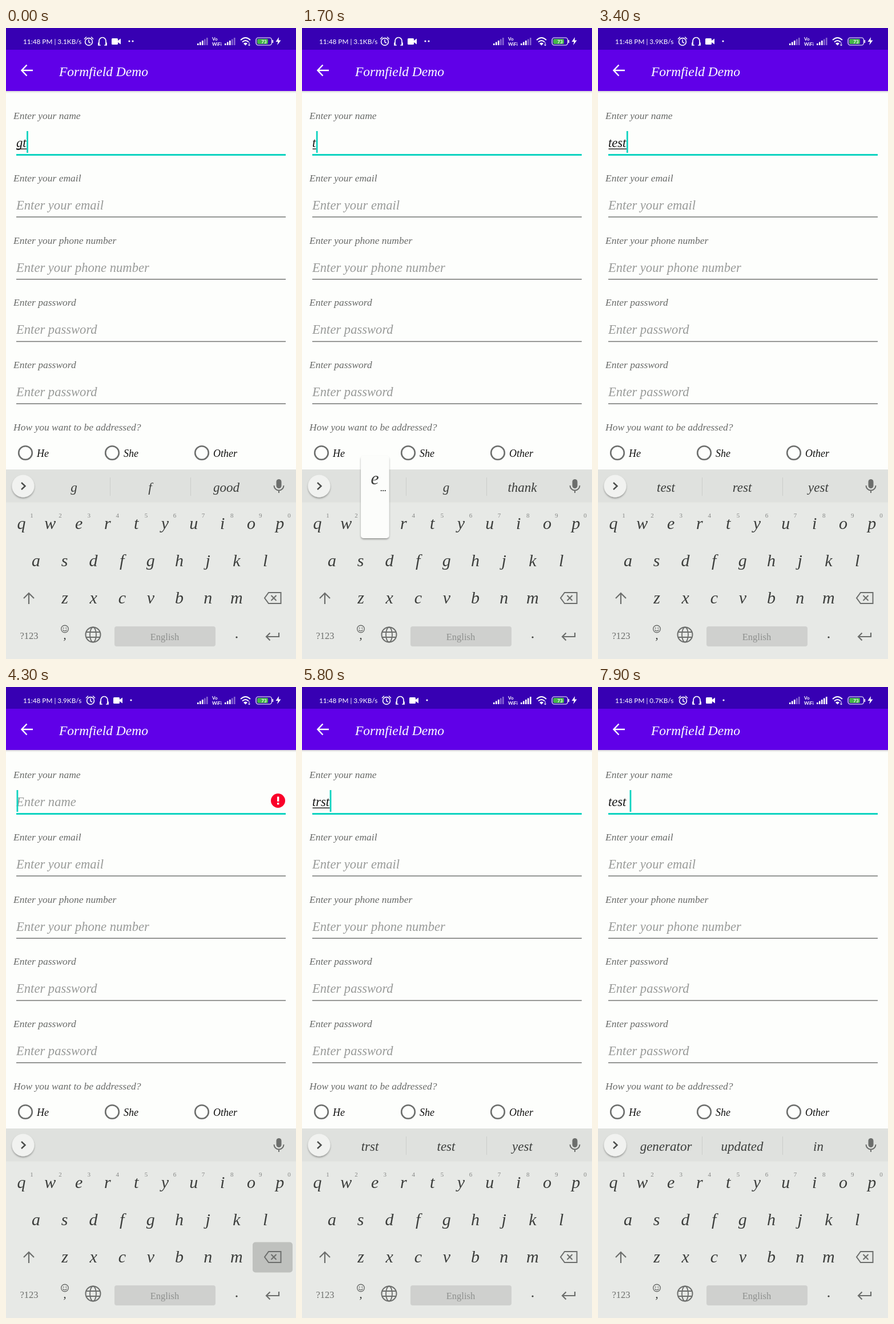
An HTML page for the animation above (8000 ms loop, 508 by 1102 pixels).

```html
<!DOCTYPE html>
<html lang="en">
<head>
<meta charset="utf-8">
<title>Form entry</title>
<style>
  html, body { margin: 0; width: 100%; height: 100%; overflow: hidden; background: #fdfefc; }
  svg { display: block; width: 508px; height: 1102px; }
  text { font-family: "Liberation Serif", "Times New Roman", serif; font-style: italic; white-space: pre; }
  .status { font: 11.8px Lato, sans-serif; fill: #fff; }
  .tiny { font: bold 8px Lato, sans-serif; fill: #fff; }
  .upright { font-style: normal; }
  .mid { text-anchor: middle; }
</style>
</head>
<body>
<svg id="stage" viewBox="0 0 508 1102" xmlns="http://www.w3.org/2000/svg"></svg>
<script>
const LOOP = 8000, STEP = 100;
const INPUT_SIZE = 22.6, INPUT_X = 18;

// Markup helpers
const text = (x, y, size, color, str, extra = '') =>
  `<text x="${x}" y="${y}" font-size="${size}" fill="${color}" ${extra}>${str}</text>`;
const mid = (x, y, size, color, str, cls = '', extra = '') =>
  text(x, y, size, color, str, `class="mid ${cls}" ${extra}`);
const rect = (x, y, w, h, fill, extra = '') =>
  `<rect x="${x}" y="${y}" width="${w}" height="${h}" fill="${fill}" ${extra}/>`;
const line = (d, color, width, extra = '') =>
  `<path d="${d}" fill="none" stroke="${color}" stroke-width="${width}" ${extra}/>`;
const circle = (x, y, r, fill, extra = '') => `<circle cx="${x}" cy="${y}" r="${r}" fill="${fill}" ${extra}/>`;

const bars = (x, id = '') => `<g id="${id}">` + [0, 1, 2, 3, 4].map(i =>
  rect(x + i * 4, 27 - i * 2.5, 2.6, 3 + i * 2.5, '#fff', `opacity="${i < 3 ? 1 : .4}"`)).join('') + '</g>';

function statusBar() {
  return rect(0, 0, 508, 38, '#3700b3') +
    `<text id="rate" class="status" x="30" y="28"></text>
    <g id="icons" stroke-linecap="round">` +
      circle(145, 24, 6.4, 'none', 'stroke="#fff" stroke-width="1.6"') +
      line('M145 20.5V24.5L147.5 26M137.5 19L140.5 16M149.5 16L152.5 19', '#fff', 1.5) +
      line('M163 29V23A6 6.5 0 0 1 175 23V29M162 26V30H165M176 26V30H173', '#fff', 1.7) +
      rect(185, 18, 11, 11, '#fff', 'rx="1.5"') + '<path d="M196 22L201 18.5V28.5L196 25Z" fill="#fff"/>' +
      circle(216, 23, 1.6, '#fff') + circle(222, 23, 1.6, '#fff', 'id="dot2"') +
    '</g>' + bars(335) +
    '<text x="361" y="22" class="tiny">Vo</text><text x="361" y="31" class="tiny">WiFi</text>' +
    bars(383, 'sim2') +
    line('M411 21Q419.5 13 428 21M414 24.5Q419.5 19.5 425 24.5', '#fff', 1.8) +
    '<path d="M416 27Q419.5 24 423 27L419.5 30.5Z" fill="#fff"/>' +
    line('M426 25V31M424.5 29L426 31L427.5 29', '#fff', 1) +
    rect(438, 17, 27.5, 13, '#3700b3', 'rx="4" stroke="#fff" stroke-width="1.2"') +
    rect(440, 19, 19, 9, '#43b649', 'rx="2"') + rect(466.5, 21, 1.6, 5, '#fff') +
    '<text class="mid tiny" x="452" y="26.5">73</text>' +
    '<path d="M478 16L472.5 24H476.5L475 30L481.5 21.5H477.5Z" fill="#fff"/>';
}

function appBar() {
  return rect(0, 110, 508, 4, 'url(#drop)') + rect(0, 38, 508, 72, '#6000e8') +
    line('M47 74H28M36.5 64.5L27.5 74L36.5 83.5', '#fff', 2.5) +
    text(93, 84, 23.5, '#fff', 'Formfield Demo');
}

function form() {
  const labels = ['Enter your name', 'Enter your email', 'Enter your phone number',
    'Enter password', 'Enter password'];
  const fields = labels.map((label, i) => {
    const y = 159 + i * 108.75;
    return text(13, y, 17.5, '#686a68', label) + (i === 0 ? '' :
      text(INPUT_X, y + 49, INPUT_SIZE, '#999b99', label) + rect(18, y + 61.5, 472, 1.5, '#737573'));
  }).join('');
  const radios = [['He', 34, 54], ['She', 186, 206], ['Other', 343, 363]].map(([name, cx, tx]) =>
    circle(cx, 742, 11.8, 'none', 'stroke="#6d6f6d" stroke-width="2.6"') +
    text(tx, 749, 18, '#111', name)).join('');
  return fields + rect(18, 220, 472, 3, '#0fd3c0') +
    text(INPUT_X, 208, INPUT_SIZE, '#999b99', 'Enter name', 'id="hint"') +
    text(INPUT_X, 208, INPUT_SIZE, '#161616', '', 'id="typed"') +
    rect(18.5, 210.5, 10, 1.5, '#222', 'id="underline"') +
    rect(19, 180, 2.8, 38, '#0fd3c0', 'id="cursor"') +
    '<g id="errorIcon">' + circle(476.5, 198.5, 12.5, '#fa0029') +
      rect(475, 191.5, 3.4, 8.5, '#fff') + rect(475, 202, 3.4, 3.4, '#fff') + '</g>' +
    text(13, 703, 17.5, '#686a68', 'How you want to be addressed?') + radios +
    '<g id="tooltip">' + rect(388, 227, 111.5, 47, '#212421', 'filter="url(#shadow)"') +
      rect(388, 225.5, 111.5, 3, '#fa0029') + '<path d="M468 226L476.5 218L485 226Z" fill="#fa0029"/>' +
      mid(443.5, 260, 17.5, '#fff', 'Enter name') + '</g>';
}

const keys = {};
function keyboard() {
  const ink = '#3c3e3c', grey = '#6c6e6c';
  const rows = [['qwertyuiop', 27, 50.3], ['asdfghjkl', 52.5, 50.2], ['zxcvbnm', 103, 50.15]];
  const letters = rows.map(([chars, x0, gap], r) => [...chars].map((c, i) => {
    keys[c] = { x: x0 + i * gap, y: 875 + r * 65 };
    return mid(keys[c].x, keys[c].y, 30, ink, c) +
      (r ? '' : mid(45 + i * 50.1, 855, 11, '#858785', (i + 1) % 10, 'upright'));
  }).join('')).join('');
  return rect(0, 771, 508, 331, '#e7e9e6') + rect(0, 771, 508, 57.5, '#dfe1de') +
    circle(30, 800, 19.5, '#f1f2f0', 'filter="url(#shadow)"') +
    line('M27 794L33.5 800L27 806', '#4b4d4b', 2.4) +
    '<g id="dividers">' + rect(182, 785, 1, 32, '#cbcdca') + rect(323, 785, 1, 32, '#cbcdca') + '</g>' +
    [119, 252.5, 386].map((x, i) => mid(x, 809.5, 23, ink, '', '', `id="word${i}"`)).join('') +
    rect(473.5, 788, 9, 16, grey, 'rx="4.5"') +
    line('M469.5 799A8.5 8.5 0 0 0 486.5 799M478 807V812', grey, 2) + letters +
    line('M40 1006V987M31 996L40 987L49 996', grey, 2.2) +
    rect(432, 969.5, 70, 53, '#bfc1be', 'rx="5" id="erasePress"') +
    line('M460 986H481.5V1005H460L453 995.5ZM464.5 991L473.5 1000M473.5 991L464.5 1000', grey, 2) +
    mid(40.5, 1067, 16.5, grey, '?123', 'upright') +
    circle(103, 1049.5, 6.3, 'none', `stroke="${grey}" stroke-width="1.4"`) +
    circle(100.7, 1048, 1, grey) + circle(105.3, 1048, 1, grey) +
    line('M99.5 1051Q103 1055 106.5 1051', grey, 1.2) + mid(103, 1067, 22, ink, ',') +
    circle(152.5, 1059.5, 13, 'none', `stroke="${grey}" stroke-width="2"`) +
    `<ellipse cx="152.5" cy="1059.5" rx="5.5" ry="13" fill="none" stroke="${grey}" stroke-width="1.8"/>` +
    line('M141 1055H164M141 1064H164', grey, 1.8) +
    rect(190, 1045, 177, 35, '#cfd0ce', 'rx="4"') + mid(278, 1069, 16.5, '#8d8f8d', 'English', 'upright') +
    circle(404, 1064, 1.6, ink) +
    line('M478 1056V1063H456M462.5 1056.5L456 1063L462.5 1069.5', grey, 2.2) +
    '<g id="popup">' + rect(-24.5, -128, 49.5, 144, '#fcfdfb', 'rx="5" filter="url(#shadow)"') +
      mid(0, -78, 32, ink, '', '', 'id="popupChar"') +
      [11, 14.5, 18].map(x => rect(x - .8, -68, 1.9, 1.9, ink)).join('') + '</g>';
}

document.getElementById('stage').innerHTML = `<defs>
  <linearGradient id="drop" x2="0" y2="1"><stop stop-color="#d8d8d8"/><stop offset="1" stop-color="#fdfefc"/></linearGradient>
  <filter id="shadow" x="-30%" y="-30%" width="160%" height="160%">
    <feDropShadow dx="0" dy="2" stdDeviation="1.8" flood-opacity=".35"/></filter></defs>` +
  rect(0, 0, 508, 1102, '#fdfefc') + appBar() + statusBar() + form() + keyboard();

const $ = id => document.getElementById(id);
const show = (id, on) => $(id).setAttribute('visibility', on ? 'visible' : 'hidden');

// [time, typed text, suggestions, pressed key]; '<' is backspace
const script = [
  [0, 'gt', 'g f good'],
  [500, 'gt', 'g f good', '<'],
  [600, 'g', 'g good f', '<'],
  [700, 'g', 'g good f'],
  [800, '', '', '<'],
  [900, '', ''],
  [1400, '', '', 't'],
  [1500, 't', 't g thank'],
  [1600, 't', 't g thank', 'e'],
  [1800, 'te', 'te the ye'],
  [1900, 'te', 'te the ye', 's'],
  [2000, 'tes', 'tes yes test'],
  [2100, 'tes', 'tes yes test', 't'],
  [2200, 'test', 'test rest yest'],
  [3800, 'test', 'test rest yest', '<'],
  [3900, 'tes', 'tes yes test', '<'],
  [4000, 'te', 'te the ye', '<'],
  [4100, 't', 't thank y', '<'],
  [4200, '', '', '<'],
  [4600, '', ''],
  [5000, '', '', 't'],
  [5100, 't', 't thank y'],
  [5300, 't', 't thank y', 'r'],
  [5400, 'tr', 'tr try true'],
  [5500, 'tr', 'tr try true', 's'],
  [5600, 'trs', 'trs yes tea'],
  [5700, 'trs', 'trs yes tea', 't'],
  [5800, 'trst', 'trst test yest'],
  [7500, 'test ', 'generator updated in']
];
const edits = script.filter((s, i) => i === 0 || s[1] !== script[i - 1][1]);
const tips = [[900, 1500], [4300, 5100]];
const rates = [[0, '3.1', 0], [2000, '3.9', 3], [6000, '0.7', 4]];

const latest = (list, t) => list.filter(item => item[0] <= t).pop();
const clamp = v => Math.max(0, Math.min(1, v));

function render(t) {
  const [, typed, words, key] = latest(script, t);
  const [edited] = latest(edits, t);

  $('typed').textContent = typed;
  const width = typed ? $('typed').getComputedTextLength() : 0;
  $('cursor').setAttribute('x', INPUT_X + .5 + width);
  show('cursor', (t - edited) % 1000 < 500);
  $('underline').setAttribute('width', width);
  show('underline', typed && !typed.endsWith(' '));
  show('hint', !typed);
  show('errorIcon', !typed);
  $('tooltip').setAttribute('opacity', Math.max(...tips.map(([start, end]) =>
    Math.min(clamp((t - start) / 200), clamp(1 - (t - end) / 200)))));

  const list = words ? words.split(' ') : [];
  [0, 1, 2].forEach(i => $('word' + i).textContent = list[i] || '');
  show('dividers', list.length);
  show('erasePress', key === '<');
  const spot = keys[key];
  show('popup', spot);
  if (spot) {
    $('popup').setAttribute('transform', `translate(${spot.x} ${spot.y})`);
    $('popupChar').textContent = key;
  }

  const [, rate, shift] = latest(rates, t);
  $('rate').textContent = `11:48 PM | ${rate}KB/s`;
  $('icons').setAttribute('transform', `translate(${shift} 0)`);
  show('dot2', !shift);
  [...$('sim2').children].forEach((bar, i) => bar.setAttribute('opacity', i < 3 || t >= 4800 ? 1 : .4));
}

const begin = performance.now();
function tick() {
  const t = (performance.now() - begin) % LOOP;
  render(Math.floor(t / STEP) * STEP);
  requestAnimationFrame(tick);
}
tick();
</script>
</body>
</html>
```
